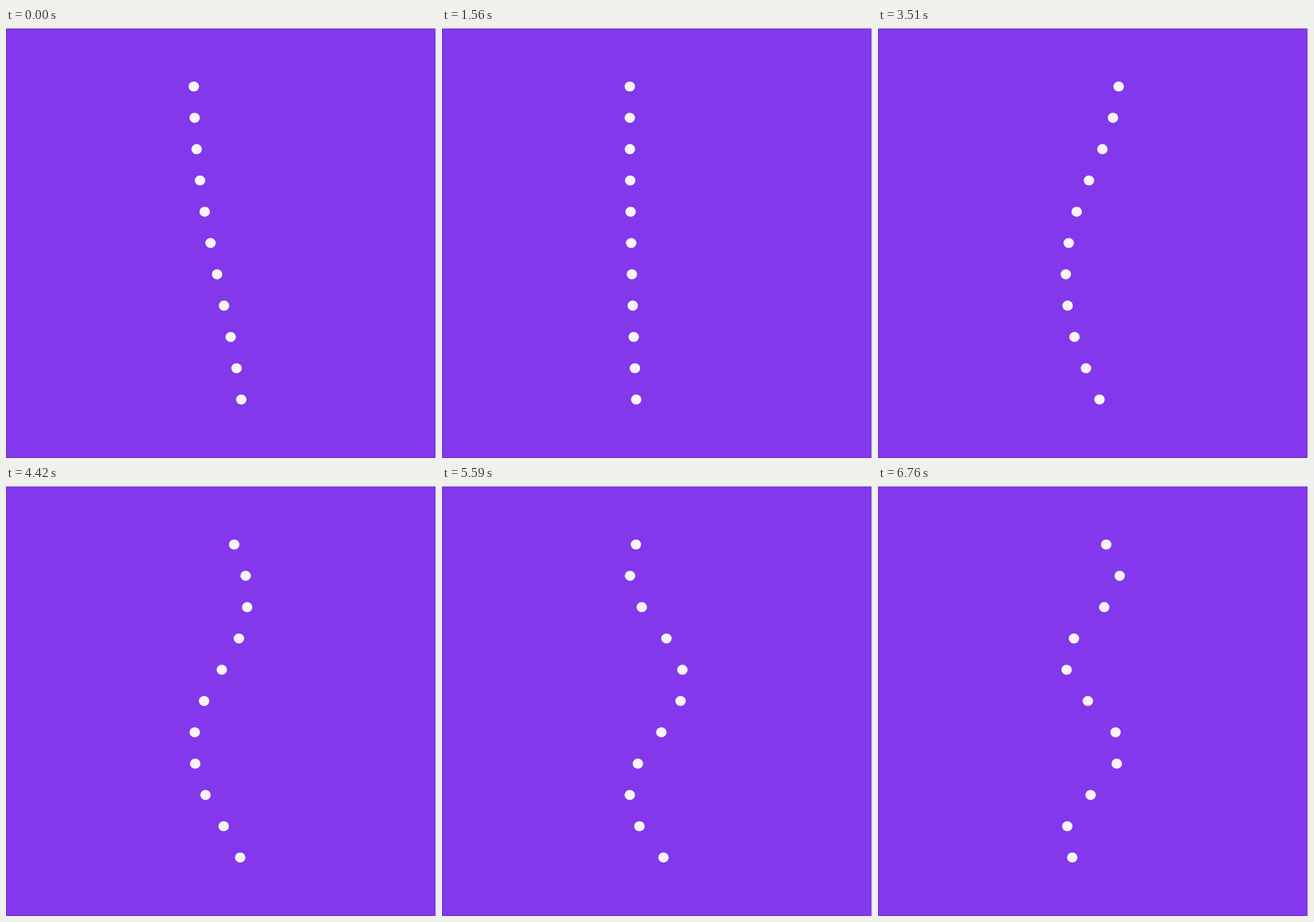
An HTML page with a canvas that plays this animation: 667 px wide and 667 px high, repeating every 6.89 s.

```html
<!DOCTYPE html>
<html lang="en">
<head>
<meta charset="utf-8">
<title>Pendulum wave</title>
<style>
  html, body { margin: 0; width: 100%; height: 100%; overflow: hidden; }
  canvas { display: block; width: 667px; height: 667px; }
</style>
</head>
<body>
<canvas id="stage" width="667" height="667"></canvas>
<script>
const ctx = document.getElementById('stage').getContext('2d');
const DOTS = 11, STEP = 130, STEPS = 53;
const HALF_SWING = 390;   // ms the top dot needs from one side to the other
const ALIGNED = 1165;     // moment when all dots meet on the right
const LEFT = 291, WIDTH = 83.6;

// Cubic bezier (.42, 0, .58, 1), solved with Newton's method
function easeInOut(p) {
  let s = p;
  for (let n = 0; n < 6; n++) {
    const error = 1.26 * s - .78 * s * s + .52 * s ** 3 - p;
    s -= error / (1.26 - 1.56 * s + 1.56 * s * s);
  }
  return s * s * (3 - 2 * s);
}

// Each dot swings 1/40 slower than the one above it
function dotX(i, time) {
  const phase = 3 + (time - ALIGNED) / HALF_SWING * (1 - i / 40);
  const turn = ((phase % 2) + 2) % 2;
  return LEFT + WIDTH * easeInOut(turn < 1 ? turn : 2 - turn);
}

function draw(time) {
  ctx.fillStyle = '#d8cdec';
  ctx.fillRect(0, 0, 667, 667);
  ctx.fillStyle = '#6c30c4';
  ctx.fillRect(0, 1, 666, 666);
  ctx.fillStyle = '#8338ec';
  ctx.fillRect(1, 2, 664, 664);
  ctx.fillStyle = '#f7f5fa';
  for (let i = 0; i < DOTS; i++) {
    ctx.beginPath();
    ctx.ellipse(dotX(i, time) + .3, 90.8 + 48.55 * i, 8.1, 7.8, 0, 0, 2 * Math.PI);
    ctx.fill();
  }
}

// Steps advance alternately by one and two ticks of 260/3 ms
function play() {
  const step = Math.floor(performance.now() / STEP) % STEPS;
  draw(Math.floor(step * 1.5) * 260 / 3);
  requestAnimationFrame(play);
}
play();
</script>
</body>
</html>
```
